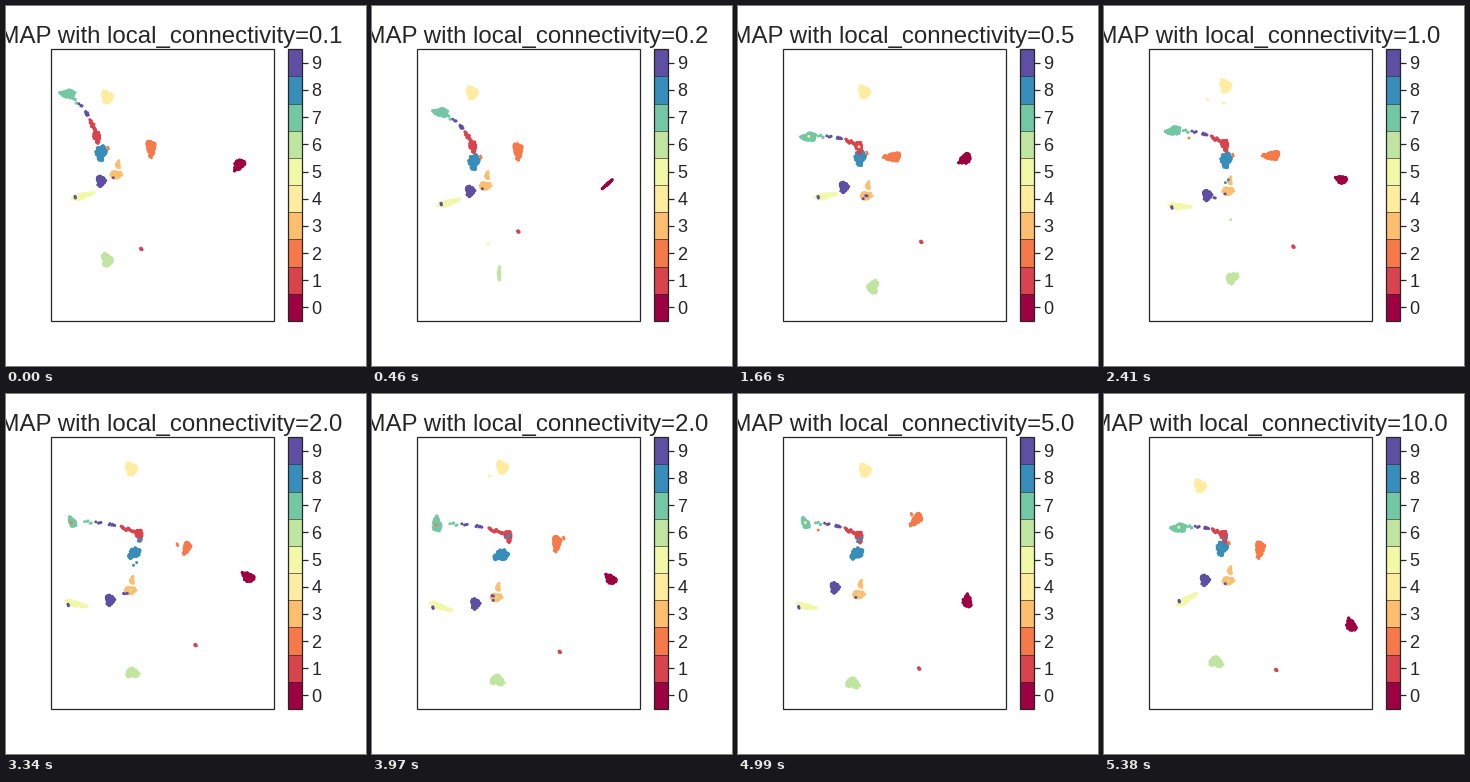
Animation of 360x360 px, one loop 5570 ms. Source, as a matplotlib script:

```python
import numpy as np
import matplotlib.pyplot as plt
from matplotlib.animation import FuncAnimation
from matplotlib.patches import Rectangle

plt.rcParams["font.family"] = "Liberation Sans"

SIZE, DPI = 360, 72
TICK, LOOP = 10, 5570            # ms
HOLD, CYCLE, STEP, STEPS = 190, 930, 30, 19
VALUES = ["0.1", "0.2", "0.5", "1.0", "2.0", "5.0", "10.0"]
INK = "0.15"
PALETTE = plt.cm.Spectral(np.linspace(0, 1, 10))

rng = np.random.default_rng(12)
clouds, labels, home = [], [], {}


def store(digit, xy):
    clouds.append(xy)
    labels.extend([digit] * xy.shape[1])


def cluster(digit, path, size, tilt=0, count=110, flip=False):
    """An uneven ellipse with one centre per layout, turned by tilt degrees.

    flip mirrors it after the first layout, so it folds on the way.
    """
    path = np.array(path, float)
    home.setdefault(digit, path)
    a = rng.uniform(0, 2 * np.pi, count)
    p, q = rng.uniform(0, 2 * np.pi, 2)
    r = np.sqrt(rng.uniform(0, 1, count))
    r *= 1 + 0.12 * np.cos(2 * a + p) + 0.18 * np.cos(3 * a + q)
    u, v = size[0] * r * np.cos(a), size[1] * r * np.sin(a)
    side = np.where(flip & (np.arange(len(path)) > 0), -1, 1)
    v = side[:, None] * v
    turn = np.radians(np.broadcast_to(tilt, len(path)))[:, None]
    xy = np.stack([u * np.cos(turn) - v * np.sin(turn),
                   u * np.sin(turn) + v * np.cos(turn)], axis=-1)
    store(digit, path[:, None] + xy)


def chain(digit, count, t0, t1):
    """Points along the arc that bends from the 7s to the 1s."""
    a, b = home[7][:, None], home[1][:, None]
    bend = 0.4 * a + 0.6 * b + (5, -9)
    t = np.linspace(t0, t1, count)[:, None]
    arc = (1 - t) ** 2 * a + 2 * t * (1 - t) * bend + t ** 2 * b
    store(digit, arc + rng.normal(0, 0.8, (count, 2)))


def stray(digit, hosts, count=1, shift=(0, 0), spread=0.5):
    """Points that sit in the named host cluster of each layout."""
    path = np.array([home[int(h)][k] for k, h in enumerate(hosts)])
    jitter = rng.normal(0, spread, (count, 2))
    store(digit, path[:, None] + jitter + shift)


cluster(0, [(233, 159), (238, 195), (227, 153), (242, 183),
            (242, 183), (221, 196), (247, 231)],
        (6, 4.6), [-42, -42, -42, 30, 25, 90, 60], flip=True)
cluster(6, [(101, 254), (151, 280), (135, 281), (125, 268),
            (127, 284), (116, 299), (112, 268)],
        (6.3, 5), [90, 90, 90, 135, 180, 180, 180], flip=True)
cluster(4, [(101, 91), (99, 83), (126, 86), (119, 77),
            (128, 74), (141, 69), (96, 92)], (5, 6.2))
cluster(2, [(145, 142), (147, 147), (155, 151), (174, 149),
            (184, 156), (189, 112), (156, 155)],
        (7.6, 4.4), [90, 90, 180, 180, 90, 152, 100])
cluster(5, [(76, 190), (76, 203), (87, 190), (69, 205),
            (69, 212), (61, 215), (82, 206)],
        (11, 2.3), [-17, -17, -12, 8, 14, 27, -33])
cluster(7, [(62, 88), (75, 123), (71, 131), (69, 122),
            (65, 131), (64, 127), (75, 134)],
        (7.8, 3.7), [8, 12, 0, -8, 90, 90, 0])
cluster(8, [(95, 147), (108, 164), (122, 152), (122, 155),
            (131, 161), (119, 162), (118, 154)],
        (7.8, 5), [90, 90, 90, 90, 155, 150, 100])
cluster(1, [(91, 131), (110, 149), (121, 141), (121, 138),
            (139, 142), (122, 143), (120, 142)], (5.6, 3), 90, 70)
cluster(3, [(110, 169), (116, 190), (128, 190), (122, 183),
            (125, 203), (119, 207), (124, 187)], (5.4, 3.8), -15, 70)
cluster(9, [(95, 175), (101, 194), (106, 181), (102, 193),
            (105, 212), (95, 197), (101, 186)], (4.6, 4.6))

cluster(3, home[3] + (2, -10), (4.6, 1.7), 95, 28)
cluster(1, [(135, 243), (156, 210), (183, 236), (192, 243),
            (188, 255), (185, 274), (172, 276)], (1.1, 0.8), 20, 6)

chain(7, 5, 0.15, 0.24)
chain(9, 4, 0.29, 0.34)
chain(9, 6, 0.46, 0.55)
chain(1, 32, 0.66, 0.9)

stray(4, "4474477")
stray(4, "4414444")
stray(5, "5666666")
stray(6, "6663333")
stray(2, "2287778")
stray(2, "8888228", 2, shift=(7, -5))
stray(8, "8883811", 2, spread=1.5)
stray(8, "8888118", 3, spread=2)
stray(9, "5555555", 3, shift=(-7, 1))
stray(9, "3333333", shift=(-3, 2))
stray(9, "9939399", 2)

order = np.argsort(np.array(labels) == 6, kind="stable")
labels = np.array(labels)[order]
layouts = np.concatenate(clouds, axis=1)[:, order]

fig = plt.figure(figsize=(SIZE / DPI, SIZE / DPI), dpi=DPI, facecolor="white")
ax = fig.add_axes([0, 0, 1, 1], xlim=(0, SIZE), ylim=(SIZE, 0))
ax.set_axis_off()

LEFT, TOP, RIGHT, BOTTOM = 45, 43.2, 268.2, 315
BAR_L, BAR_R = 282.15, 295.74
TICK_LEN, TICK_PAD = 6, 3.5
cell = (BOTTOM - TOP) / 10


def outline(x0, x1):
    ax.add_patch(Rectangle((x0, TOP), x1 - x0, BOTTOM - TOP, fill=False,
                           ec=INK, lw=1.25, joinstyle="miter", zorder=4))


points = ax.scatter(*layouts[0].T, s=2, c=PALETTE[labels],
                    linewidths=1.5, edgecolors="face", zorder=2)
outline(LEFT, RIGHT)

for digit in range(10):
    y = BOTTOM - (digit + 1) * cell
    ax.add_patch(Rectangle((BAR_L, y), BAR_R - BAR_L, cell,
                           fc=PALETTE[digit], lw=0))
    ax.text(BAR_R + TICK_LEN + TICK_PAD, y + cell / 2, str(digit),
            size=18, color=INK, va="center_baseline")
rows = np.arange(10)
ax.hlines(TOP + cell * rows[1:], BAR_L, BAR_R, colors=INK, lw=0.625, zorder=3)
ax.hlines(TOP + cell * (rows + 0.5), BAR_R, BAR_R + TICK_LEN,
          colors=INK, lw=1.25)
outline(BAR_L, BAR_R)

title = ax.text((LEFT + RIGHT) / 2, TOP - 6, "", size=24, color=INK,
                ha="center", va="baseline")


def update(frame):
    since = frame * TICK - HOLD
    leg, step = 0, 0
    if since >= 0:
        leg, rest = divmod(since, CYCLE)
        step = min(rest // STEP + 1, STEPS)
    t = step / STEPS
    points.set_offsets((1 - t) * layouts[leg] + t * layouts[leg + 1])
    value = VALUES[leg + (step >= 10)]
    title.set_text(f"UMAP with local_connectivity={value}")
    return points, title


anim = FuncAnimation(fig, update, frames=LOOP // TICK, interval=TICK,
                     init_func=lambda: update(0), repeat=True,
                     repeat_delay=0, cache_frame_data=False)
plt.show()
```
